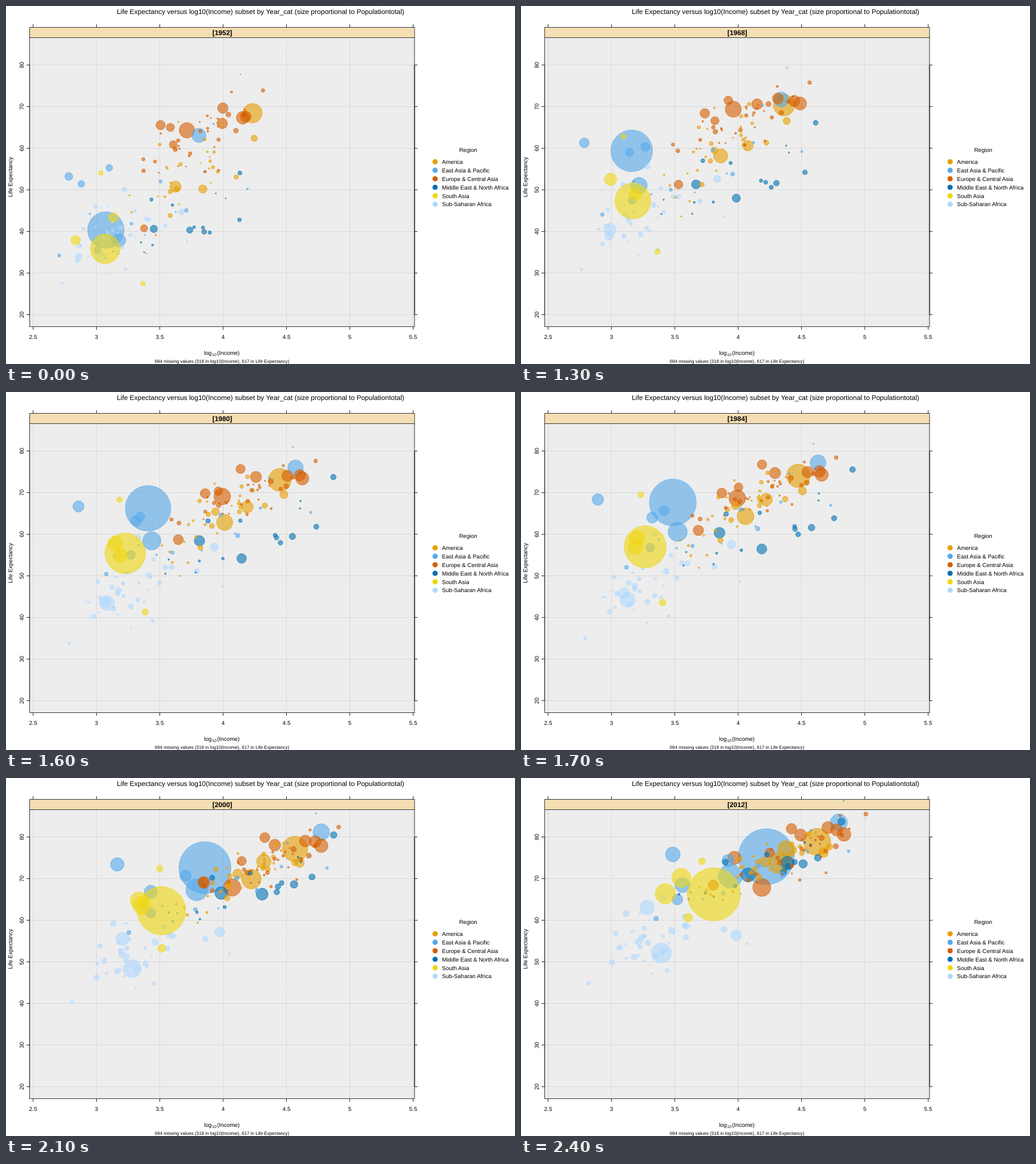
Animation of 892 by 628 pixels, one loop 3.4 s. Source, as an HTML page:

```html
<!DOCTYPE html>
<html lang="en">
<head>
<meta charset="utf-8">
<title>Life Expectancy versus log10(Income)</title>
<style>
html, body { margin: 0; width: 100%; height: 100%; overflow: hidden; background: #fff; }
svg { display: block; width: 892px; height: 628px; font: 10px "Liberation Sans", Arial, sans-serif; text-rendering: geometricPrecision; }
.mid { text-anchor: middle; }
.frame { stroke: #333; fill: none; }
.strip { stroke: #333; fill: #f5deb3; }
.grid { stroke: #c4c4c4; stroke-dasharray: 1 1; }
.tick { stroke: #222; }
#dots circle { fill-opacity: .6; stroke-opacity: .65; }
</style>
</head>
<body>
<svg viewBox="0 0 892 628">
  <rect x="41.5" y="55.5" width="674.5" height="507" fill="#ededed"/>
  <rect x="41.5" y="37.5" width="674.5" height="18" class="strip"/>
  <g id="axes"></g>
  <g id="dots"></g>
  <rect x="41.5" y="55.5" width="674.5" height="507" class="frame"/>
  <path d="M41.5 103.5V541.5M716 103.5V541.5" stroke="#000"/>
  <text x="446" y="14" class="mid" font-size="12">Life Expectancy versus log10(Income) subset by Year_cat (size proportional to Populationtotal)</text>
  <text id="year" x="379" y="51" class="mid" font-size="12" font-weight="bold">[1952]</text>
  <text transform="translate(11 300) rotate(-90)" class="mid">Life Expectancy</text>
  <text x="347" y="612">log</text>
  <text x="361" y="614" font-size="7">10</text>
  <text x="370" y="612">(Income)</text>
  <text x="378.5" y="626" class="mid" font-size="8">694 missing values (318 in log10(Income), 617 in Life Expectancy)</text>
  <text x="810" y="256" class="mid">Region</text>
  <g id="legend"></g>
</svg>
<script>
const $ = id => document.getElementById(id);

function make(parent, tag, attrs, text) {
  const el = document.createElementNS("http://www.w3.org/2000/svg", tag);
  for (const k in attrs) el.setAttribute(k, attrs[k]);
  if (text) el.textContent = text;
  return parent.appendChild(el);
}

const line = (x1, y1, x2, y2, cls) => make($("axes"), "line", { x1, y1, x2, y2, class: cls });

for (let i = 0; i < 7; i++) {
  const x = 47.5 + i * 111, y = 541.5 - i * 73;
  line(x, 56, x, 562, "grid");
  line(x, 32, x, 37, "tick");
  line(x, 563, x, 568, "tick");
  make($("axes"), "text", { x, y: 583.5, class: "mid" }, String(2.5 + i / 2));
  line(42, y, 716, y, "grid");
  line(36, y, 41, y, "tick");
  line(716, y, 721, y, "tick");
  make($("axes"), "text", { transform: `translate(30.5 ${y}) rotate(-90)`, class: "mid" }, String(20 + i * 10));
}

const regions = [
  ["America", "#e69f00"], ["East Asia & Pacific", "#56a9e9"],
  ["Europe & Central Asia", "#d55e00"], ["Middle East & North Africa", "#0072b2"],
  ["South Asia", "#f0d710"], ["Sub-Saharan Africa", "#b0d9ff"]
];
const [am, ea, eu, me, sa, af] = regions.map(r => r[1]);
regions.forEach(([name, fill], i) => {
  const y = 273.3 + i * 14.9;
  make($("legend"), "circle", { cx: 752, cy: y, r: 4.6, fill });
  make($("legend"), "text", { x: 764, y: y + 3.6 }, name);
});

// One step is four years; a bubble's points fall on the steps for its point count.
const last = 15;
const keySets = { 3: [0, 7, 15], 4: [0, 4, 10, 15], 7: [0, 1, 4, 7, 10, 13, 15] };
const bubbles = [];
const add = (color, r0, r1, ...pts) => bubbles.push({ color, r0, r1, pts, keys: keySets[pts.length] });

// Populous countries
add(ea, 32, 49, [175, 393], [193, 319], [194, 254], [249, 204], [302, 178], [374, 148], [430, 138]);
add(sa, 26, 46.5, [174, 426], [184, 406], [196, 342], [209, 283], [241, 255], [291, 222], [338, 204]);
add(am, 17, 23.7, [432, 188], [461, 174], [497, 134], [519, 112]);
add(ea, 11.8, 21, [198, 411], [207, 315], [309, 217], [367, 172]);
add(eu, 13.5, 15.8, [317, 218], [372, 181], [383, 191], [422, 192]);
add(ea, 12.5, 15, [338, 227], [456, 164], [542, 108], [557, 78]);
add(am, 10, 19, [297, 317], [350, 263], [413, 197], [453, 149]);
add(af, 8.6, 17.5, [166, 441], [156, 392], [205, 351], [246, 307]);
add(sa, 8.3, 17.8, [122, 411], [157, 304], [224, 239], [253, 203]);
add(sa, 8.6, 16.7, [188, 371], [200, 330], [209, 242], [281, 175]);
add(am, 7.3, 14.2, [345, 321], [398, 245], [442, 165], [464, 124]);
add(ea, 7, 13, [110, 299], [111, 240], [157, 167], [266, 134]);
add(ea, 6, 13, [181, 284], [218, 247], [238, 209], [283, 188]);
add(eu, 11.2, 12, [415, 196], [489, 171], [541, 132], [566, 99]);
add(af, 6, 12.8, [127, 440], [174, 368], [221, 227]);
add(me, 6.4, 12.3, [259, 391], [339, 261], [398, 170]);
add(me, 5.5, 11.7, [322, 393], [413, 292], [467, 149]);
add(eu, 6.2, 11.6, [242, 390], [302, 259], [374, 140]);
add(ea, 6, 11, [132, 312], [235, 219], [363, 145]);
add(eu, 9.5, 10.6, [420, 194], [515, 146], [553, 91]);
add(eu, 9.2, 10.6, [380, 179], [493, 147], [538, 87]);
add(eu, 9.2, 10.5, [379, 206], [438, 149], [490, 100]);
add(eu, 8.2, 9, [271, 209], [349, 178], [337, 188]);
add(eu, 7.1, 9.2, [288, 213], [411, 135], [474, 89]);
add(eu, 6.8, 8.3, [293, 243], [372, 174], [436, 131]);
add(af, 5, 9.7, [308, 361], [365, 272], [377, 276]);
add(ea, 6, 9.5, [160, 428], [219, 286], [274, 213]);
add(am, 5.6, 8.6, [435, 232], [487, 180], [530, 131]);
add(am, 4.7, 9.2, [299, 321], [367, 210], [428, 147]);
add(sa, 3.9, 7.6, [240, 487], [244, 386], [293, 245]);
add(sa, 4, 6, [166, 293], [199, 189], [317, 146]);

let seed = 29;
const rnd = () => (seed = seed * 16807 % 2147483647) / 2147483647;
const bell = () => rnd() + rnd() + rnd() - 1.5;

// Smaller countries: a sloping cloud per region, given as
// [centre x, centre y, spread along, spread across, slope] at start, middle and end.
function flock(color, count, size, growth, ...clouds) {
  while (count--) {
    const u = bell() * 2, v = bell() * 2, r = 1 + size * rnd() ** 1.6;
    const pts = clouds.map(([cx, cy, along, across, slope]) => {
      const dx = u * along + bell() * 12;
      return [cx + dx, cy - slope * dx + v * across];
    });
    add(color, r, r * growth, ...pts);
  }
}

flock(eu, 32, 3.5, 1.1, [345, 232, 58, 28, .45], [430, 180, 62, 15, .35], [498, 132, 55, 20, .4]);
flock(am, 30, 3, 1.5, [315, 300, 50, 42, .5], [370, 222, 48, 26, .6], [435, 148, 58, 14, .4]);
flock(ea, 12, 2.5, 1.4, [255, 325, 80, 45, .7], [345, 235, 85, 28, .5], [400, 165, 85, 20, .5]);
flock(me, 15, 3.2, 1.8, [315, 365, 60, 30, .3], [445, 235, 75, 28, .35], [440, 145, 70, 18, .35]);
flock(af, 38, 3, 1.55, [185, 405, 55, 35, .2], [215, 345, 62, 38, .25], [230, 285, 62, 32, .15]);

// Large bubbles lie below small ones, South Asia above the rest.
const layer = b => (b.color === sa ? -100 : 0) + b.r1;
bubbles.sort((a, b) => layer(b) - layer(a));
for (const b of bubbles) b.el = make($("dots"), "circle", { fill: b.color, stroke: b.color });

// Smooth curve through the points
function at({ keys, pts }, step, axis) {
  let i = 0;
  while (i < keys.length - 2 && step > keys[i + 1]) i++;
  const span = keys[i + 1] - keys[i], f = (step - keys[i]) / span;
  const slope = n => {
    const a = Math.max(n - 1, 0), b = Math.min(n + 1, keys.length - 1);
    return (pts[b][axis] - pts[a][axis]) / (keys[b] - keys[a]) * span;
  };
  const p = pts[i][axis], q = pts[i + 1][axis], g = 1 - f;
  return p + (q - p) * f * f * (3 - 2 * f) + slope(i) * f * g * g - slope(i + 1) * f * f * g;
}

let shown = -1;
function draw(now) {
  const ms = now % 3400;
  const step = ms < 1000 ? 0 : Math.min(last, Math.floor((ms - 900) / 100));
  if (step !== shown) {
    shown = step;
    $("year").textContent = `[${1952 + 4 * step}]`;
    for (const b of bubbles) {
      b.el.setAttribute("cx", at(b, step, 0));
      b.el.setAttribute("cy", at(b, step, 1));
      b.el.setAttribute("r", b.r0 + (b.r1 - b.r0) * step / last);
    }
  }
  requestAnimationFrame(draw);
}
draw(0);
</script>
</body>
</html>
```
